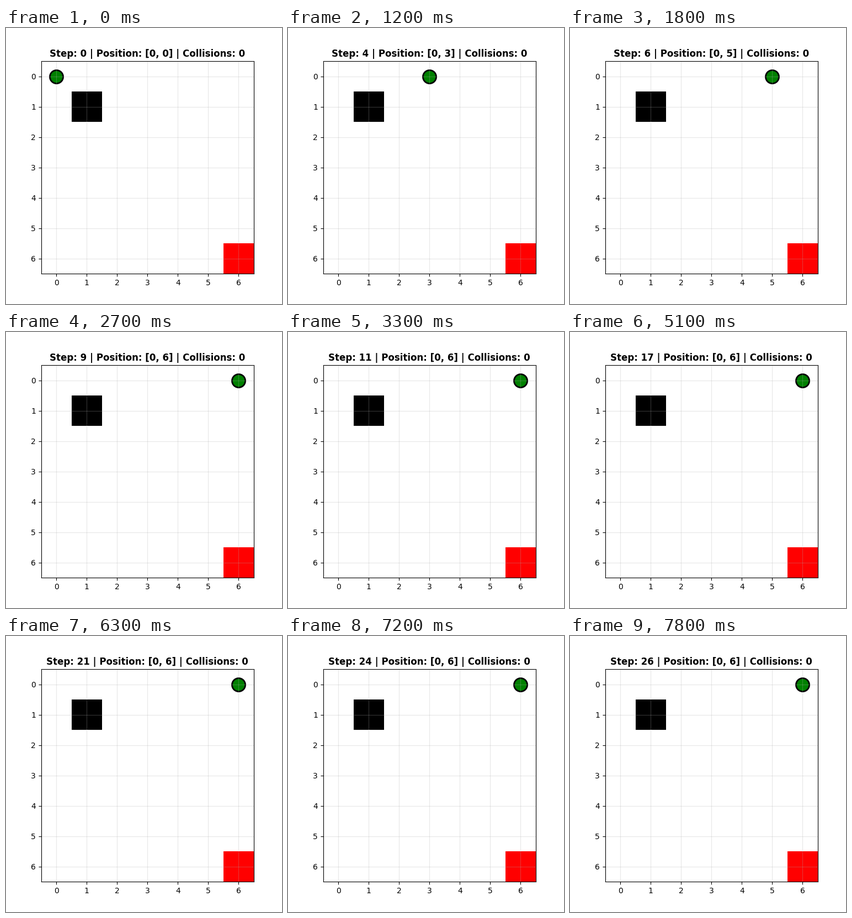
Animation of 500x500 px, one loop 8000 ms. Source, as a matplotlib script:

```python
import numpy as np
import matplotlib.pyplot as plt
from matplotlib.animation import FuncAnimation

SIZE = 7
TICK_MS = 100
TICKS_PER_STEP = 3
LOOP_MS = 8000

plt.rcParams["font.family"] = "DejaVu Sans"

grid = np.ones((SIZE, SIZE, 3))
grid[1, 1] = (0, 0, 0)
grid[6, 6] = (1, 0, 0)

fig, ax = plt.subplots(figsize=(5, 5), dpi=100)
ax.imshow(grid, interpolation="nearest")
ax.set_xticks(range(SIZE))
ax.set_yticks(range(SIZE))
ax.grid(True, alpha=0.3)
agent = ax.scatter([0], [0], s=300, c="green", edgecolors="black", linewidths=2)
title = ax.set_title("", fontsize=12, fontweight="bold")


def column(step):
    """Wait one step, then walk right until the wall."""
    return min(max(step - 1, 0), SIZE - 1)


def update(tick):
    step = tick // TICKS_PER_STEP
    col = column(step)
    agent.set_offsets([[col, 0]])
    title.set_text(f"Step: {step} | Position: [0, {col}] | Collisions: 0")
    return agent, title


anim = FuncAnimation(fig, update, frames=LOOP_MS // TICK_MS, interval=TICK_MS,
                     init_func=lambda: update(0), repeat=True, blit=False)
plt.show()
```
